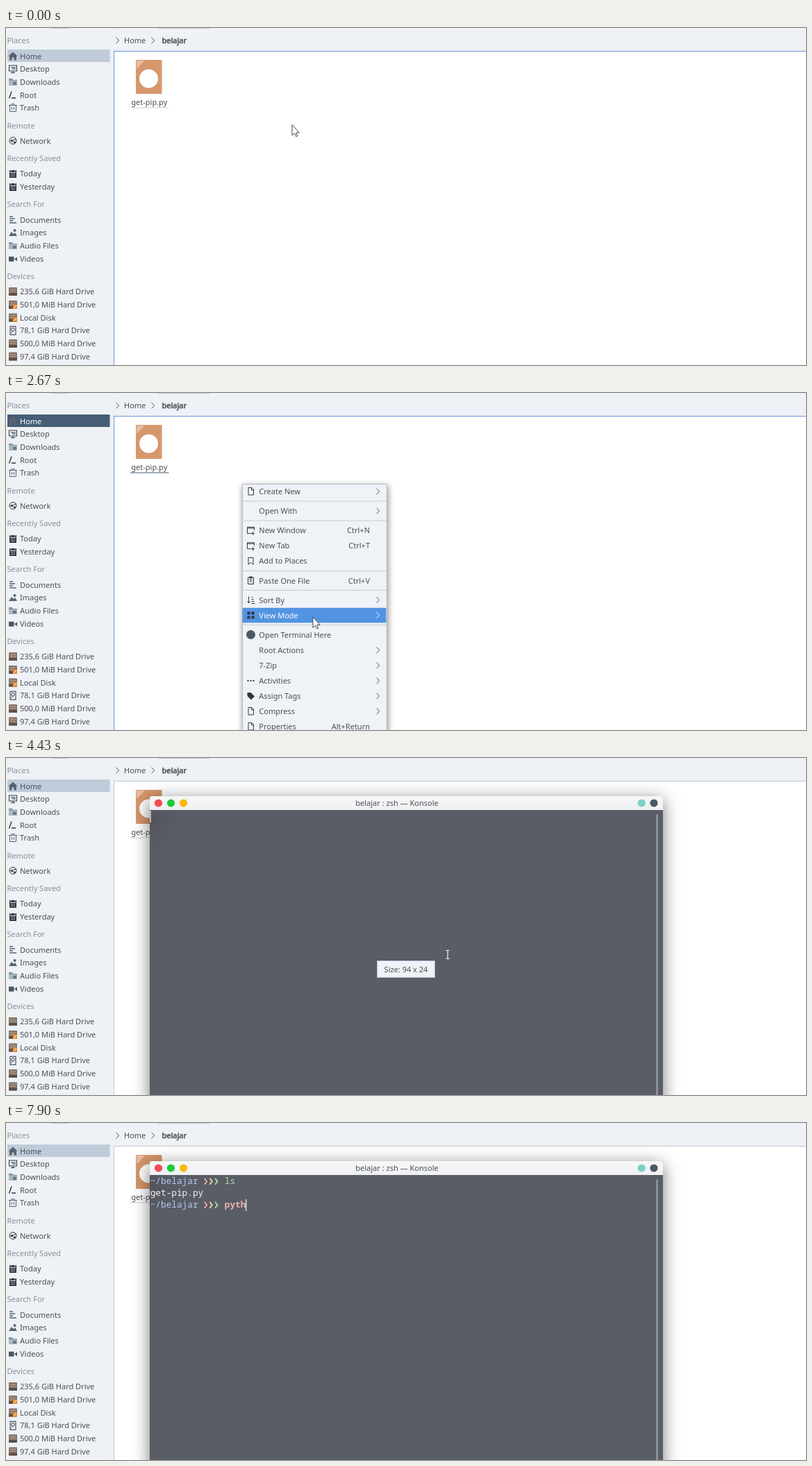
Recreate the animation shown at these times as an HTML page. Size 1152 px wide and 486 px high, loop 8000 ms.

```html
<!DOCTYPE html>
<html lang="en">
<head>
<meta charset="utf-8">
<title>File manager and terminal</title>
<style>
html, body { margin: 0; height: 100%; overflow: hidden; background: #eef1f5; }
svg { display: block; width: 100vw; height: 100vh; font: 11px "Noto Sans", sans-serif; }
text { fill: #4b4f58; white-space: pre; }
.head { fill: #8b9098; }
.strong { stroke: #4b4f58; stroke-width: .55; }
.line { fill: none; stroke: #4b4f58; }
.dark { fill: #30353c; }
.icon { stroke: #30353c; fill: none; }
#homeRow { fill: #bfcbd9; }
#frame { fill: #fff; stroke: #6f91dc; }
#underline { stroke: #c9cfdb; }
.busy #homeRow { fill: #465c77; }
.busy #homeText { fill: #fff; }
.busy #underline { stroke: #465c77; }
.covered #frame { stroke: #c5cad2; }
.selected text { fill: #fff; }
.selected .arrow { stroke: #fff; }
.panel { fill: #eff2f6; stroke: #b4bac4; filter: drop-shadow(1px 3px 5px #0007); }
.mono { font: 12.75px "Noto Sans Mono", monospace; }
</style>
</head>
<body>
<svg id="stage" viewBox="0 0 1152 486" preserveAspectRatio="none"></svg>
<script>
const stage = document.getElementById('stage');
const text = (x, y, s, attrs = '') => `<text x="${x}" y="${y}" ${attrs}>${s}</text>`;
const rect = (x, y, w, h, attrs = '') => `<rect x="${x}" y="${y}" width="${w}" height="${h}" ${attrs}/>`;
const path = (d, attrs = 'class="icon"') => `<path d="${d}" ${attrs}/>`;
const dot = (x, y, r, fill) => `<circle cx="${x}" cy="${y}" r="${r}" fill="${fill}"/>`;
const at = (x, y, body, attrs = '') => `<g transform="translate(${x} ${y})" ${attrs}>${body}</g>`;
const chevron = (x, y) => path(`M${x} ${y - 4.2}l4.3 4.2l-4.3 4.2`, 'class="line arrow"');

// Sidebar icons, centred on 0,0
const folder = path('M-6 -5h5l1 2h6v8h-12z', 'fill="#8496a5"') +
  rect(-6, -2, 12, 7, 'fill="#a9b8c3"') + rect(0, 0, 5, 4, 'fill="#667887"');
const drive = rect(-6, -6, 12, 12, 'rx="1" fill="#8a7668"') +
  rect(-6, 2, 12, 4, 'fill="#5d5049"') + path('M-4 -3h8M-4 0h8', 'stroke="#b5a396"');
const mounted = drive + rect(0, 0, 6, 6, 'fill="#f08a24"') + path('M1 5l4 -4', 'stroke="#fff"');
const calendar = rect(-5, -5, 10, 11, 'class="dark"') +
  path('M-3 -6v3M3 -6v3M-4 -1.5h8', 'stroke="#eef1f5"') +
  path('M-3 1h6M-3 3.5h6', 'stroke="#eef1f5" stroke-dasharray="1.4 1"');
const icons = {
  home: path('M-6.5 0L0 -6l6.5 6h-1.5v6h-3.5v-4h-3v4h-3.5v-6z', 'fill="#59636f"'),
  desktop: rect(-5.5, -5, 11, 8, 'class="icon"') + path('M-3 5.5h6M0 3v2M-3 -2h3v3') +
    rect(0, -3, 4, 4, 'fill="#8496a5"'),
  folder, drive, mounted, calendar,
  root: path('M-5 -5l3.5 10M0 4.5h6', 'class="icon" stroke-width="1.4" transform="scale(-1 1) translate(2 0) scale(-1 1)"')
    .replace('M-5 -5l3.5 10', 'M0 -5l-3.5 10'),
  trash: path('M-4.5 -3v8.5h9v-8.5M-6 -3.5h12M-2 -3.5v-2h4v2M-1.5 -1v4M1.5 -1v4', 'class="icon" style="stroke:#59636f"'),
  network: '<circle r="5" class="icon"/>' + path('M5 -2.5L-2 0L3 3') + dot(-2, 0, 1.5, '#30353c') + dot(2.5, 2.4, 1.4, '#30353c'),
  documents: path('M-5 -4.5h5M-5 -1.5h8M-5 1.5h5M-5 4.5h10', 'stroke="#59636f" stroke-width="1.6"'),
  images: path('M-6 5l4 -6l3 3l2 -2l3 5z', 'fill="#59636f"') + dot(2.5, -3, 2, '#59636f'),
  video: rect(-6, -3, 7.5, 7, 'fill="#4b5561"') + path('M2 0.5l4 -3v6z', 'fill="#4b5561"'),
  disk: rect(-4, -6, 8, 12, 'class="icon"') + '<circle cy="-1.5" r="2.3" class="icon"/>' + path('M-3 4l3 -3')
};
const heads = [[18, 'Places'], [140.5, 'Remote'], [188, 'Recently Saved'], [254, 'Search For'], [358, 'Devices']];
const places = [
  [40.5, 'Home', 'home'], [59, 'Desktop', 'desktop'], [77.7, 'Downloads', 'folder'],
  [96.5, 'Root', 'root'], [115, 'Trash', 'trash'], [162.5, 'Network', 'network'],
  [210, 'Today', 'calendar'], [229, 'Yesterday', 'calendar'], [276.5, 'Documents', 'documents'],
  [295, 'Images', 'images'], [314, 'Audio Files', 'folder'], [332.7, 'Videos', 'video'],
  [380, '235,6 GiB Hard Drive', 'drive'], [399, '501,0 MiB Hard Drive', 'mounted'],
  [417.6, 'Local Disk', 'mounted'], [436.3, '78,1 GiB Hard Drive', 'disk'],
  [455, '500,0 MiB Hard Drive', 'drive'], [473.6, '97,4 GiB Hard Drive', 'drive']
];
const sidebar = rect(2, 31, 147.5, 18, 'id="homeRow"') +
  heads.map(([y, s]) => text(1.5, y + 4, s, 'class="head"')).join('') +
  places.map(([y, s, icon], i) => at(10, y, icons[icon]) + text(20, y + 4, s, i ? '' : 'id="homeText"')).join('');

const toolbar = path('M65 .5h25M219 .5h74M153.5 0v1', 'stroke="#c3c8ce"') +
  chevron(158.5, 18) + text(170, 22, 'Home') + chevron(209.5, 18) + text(224.5, 22, 'belajar', 'class="strong"');

const file = `<g id="fileIcon">${rect(187, 46, 37.5, 49, 'rx="1" fill="#d6976c"')}
  ${path('M188 59v-12h12z', 'fill="#e6bda0"')}${dot(205.5, 73, 13.5, '#fff')}</g>` +
  rect(179, 98, 55.5, 17, 'id="labelHover" fill="#e8ecf2"') +
  text(180.3, 110.5, 'get-pip.py') + path('M179 115h55.5', 'id="underline"') +
  `<g id="plus">${rect(179.5, 42.5, 18, 18, 'fill="#b9babb" stroke="#929496"')}
  ${path('M188.5 45v13M182 51.5h13', 'stroke="#fff" stroke-width="1.6"')}</g>`;

// Context menu
const pageIcon = path('M-3.5 -5.5h5l2.5 2.5v8h-7.5z') + path('M1 -5v3h3');
const windowIcon = path('M5 0v-4.5h-10v9h5M-5 -3h10M3 2v5M.5 4.5h5');
const items = [
  [142, 'Create New', '>', pageIcon], [170, 'Open With', '>'],
  [198, 'New Window', 'Ctrl+N', windowIcon], [220.3, 'New Tab', 'Ctrl+T', windowIcon],
  [242.4, 'Add to Places', '', path('M-3.5 -5h7v10l-3.5 -3l-3.5 3z')],
  [270.5, 'Paste One File', 'Ctrl+V', path('M-4 -4.5h8v9.5h-8zM-2 -1h4M-2 1.5h4') + rect(-2, -6, 4, 3, 'class="dark"')],
  [298.5, 'Sort By', '>', path('M-3 -5v9M-5 2l2 2.5l2 -2.5M1 -4h2M1 -1h3M1 2h4M1 5h5')],
  [320.5, 'View Mode', '>', [[-5, -5], [1, -5], [-5, 1], [1, 1]].map(([x, y]) => rect(x, y, 4, 4, 'class="dark"')).join('')],
  [348.5, 'Open Terminal Here', '', dot(0, 0, 6.5, '#4a5963')],
  [370.8, 'Root Actions', '>'], [392.9, '7-Zip', '>'],
  [414.9, 'Activities', '>', path('M-5 0h10', 'stroke="#30353c" stroke-width="2" stroke-dasharray="2 2"')],
  [437, 'Assign Tags', '>', path('M-5 -5h5l5.5 5.5l-5 5l-5.5 -5.5z', 'class="dark"')],
  [459, 'Compress', '>', pageIcon], [481, 'Properties', 'Alt+Return', pageIcon]
];
const entry = (x, w, [y, label, right, icon = '']) => `<g class="entry" data-y="${y}">` +
  rect(x + .5, y - 10.7, w - 1, 21.6, 'fill="#5294e2" class="bar"') + at(x + 12.5, y, icon) + text(x + 24.3, y + 4, label) +
  (right === '>' ? chevron(x + 193.5, y) : text(x + w - 24, y + 4, right, 'text-anchor="end"')) + '</g>';
const menu = `<g id="menu">${rect(340.5, 131.5, 208, 370, 'class="panel"')}` +
  path([156, 184, 256.5, 284.5, 334.5].map(y => `M341 ${y}h207`).join(''), 'stroke="#c6ccd4"') +
  items.map(item => entry(340, 208, item)).join('') + '</g>';
const submenu = `<g id="submenu">${rect(548.5, 309.5, 157, 67, 'class="panel"')}` +
  ['Icons', 'Compact', 'Details'].map((s, i) =>
    entry(548, 157, [320.5 + 22 * i, s, `Ctrl+${i + 1}`, `<circle r="5" class="icon"/>${i ? '' : dot(0, 0, 2.5, '#30353c')}`])).join('') + '</g>';

// Terminal
const CELL = 7.65;
const column = n => 207.7 + n * CELL;
const mono = (col, y, s, fill, attrs = '') => text(column(col), y, s, `class="mono" style="fill:${fill}" ${attrs}`);
const prompt = y => mono(0, y, '~/belajar', '#b5c9f2') +
  ['#efb0b0', '#f3e3a6', '#b0dfad'].map((color, i) =>
    path(`M${column(10 + i) + 1.6} ${y - 8.5}l3.4 4.5l-3.4 4.5`, `fill="none" stroke="${color}" stroke-width="1.7"`)).join('');
const terminal = `<g id="terminal">
  <path d="M207 500V58q0 -3 3 -3h733q3 0 3 3v442z" fill="#595d66" style="filter:drop-shadow(0 5px 12px #0008)"/>
  <path d="M207 75V58q0 -3 3 -3h733q3 0 3 3v17z" fill="url(#bar)"/>
  ${rect(207, 75, 70, 75, 'fill="url(#ghost)"')}
  ${dot(219.5, 65, 5.6, '#f04d55')}${dot(237.5, 65, 5.6, '#1acb3b')}${dot(255.5, 65, 5.6, '#fbb80f')}
  ${dot(915.3, 65, 5.6, '#7bd0c9')}${dot(933, 65, 5.6, '#4a5963')}
  ${text(563, 69, 'belajar : zsh — Konsole', 'text-anchor="middle"')}
  ${rect(936, 81, 3, 420, 'rx="1.5" fill="#8c9099"')}
  <g id="firstPrompt">${prompt(88.3)}</g>${mono(14, 88.3, '', '#b0dfad', 'id="list"')}
  <g id="output">${mono(0, 105.3, 'get-pip.py', '#f4f5f7')}${prompt(122.3)}</g>
  ${mono(14, 122.3, '', '#f0b0b3', 'id="command" font-weight="bold"').replace('style="', 'style="font-weight:bold;')}
  ${rect(0, 0, 1.2, 17, 'id="caret" fill="#f4f5f7"')}
  <g id="size">${rect(534.5, 292.5, 83, 24, 'fill="#eff2f7" stroke="#aab8cc"')}${text(576, 308.5, 'Size: 94 x 24', 'text-anchor="middle"')}</g>
  <g id="beam">${path('M633.5 277.5h2l.5 .5l.5 -.5h2M636 278v11M633.5 289.5h2l.5 -.5l.5 .5h2', 'fill="none" stroke="#f4f5f7" stroke-width="1.2"')}</g>
</g>`;

stage.innerHTML = `<defs>
  <linearGradient id="bar" x2="0" y2="1"><stop stop-color="#f7f7f8"/><stop offset="1" stop-color="#eff0f1"/></linearGradient>
  <radialGradient id="ghost" cx="0" cy=".2" r=".9"><stop stop-color="#4f4d52" stop-opacity=".6"/><stop offset="1" stop-color="#595d66" stop-opacity="0"/></radialGradient>
</defs>` + rect(0, 0, 1152, 486, 'fill="#eef1f5"') + sidebar + toolbar +
  rect(155.5, 33.5, 1010, 470, 'id="frame"') + file + menu + submenu +
  '<ellipse id="launcher" fill="#4a5963"/>' + terminal +
  path('M.5 .5V16L4 12.8L6.2 17.6L8.3 16.6L6.2 12H10.8Z', 'id="pointer" fill="#fff" stroke="#44484e" stroke-linejoin="round"');

const $ = id => document.getElementById(id);
const entries = [...document.querySelectorAll('.entry')];
const show = (id, on) => { $(id).style.display = on ? '' : 'none'; };
const clamp = v => Math.max(0, Math.min(1, v));

// Pointer moves: first step, last step, number of steps, goal
const moves = [
  [630, 970, 11, 230, 97], [1430, 1800, 4, 340, 136], [2230, 2670, 4, 441.5, 322.5],
  [3230, 3470, 3, 432, 344], [3770, 4200, 4, 635, 282.5]
];
function pointerAt(t) {
  let x = 411.5, y = 139;
  for (const [start, end, steps, goalX, goalY] of moves) {
    if (t < start) break;
    const p = (1 + Math.floor(clamp((t - start) / (end - start)) * (steps - 1))) / steps;
    x += (goalX - x) * p;
    y += (goalY - y) * p;
  }
  return [x, y];
}

function draw(t) {
  const [x, y] = pointerAt(t);
  const terminalOpen = t >= 4430, menuOpen = t >= 2130 && t < 3770;
  stage.classList.toggle('busy', t >= 2130 && !terminalOpen);
  stage.classList.toggle('covered', terminalOpen);

  const hover = clamp((t - 870) / 100) * clamp((1630 - t) / 200);
  $('fileIcon').style.opacity = 1 - .4 * hover;
  $('labelHover').style.opacity = hover;
  show('plus', t >= 1330 && t < 1530);

  show('menu', menuOpen);
  show('submenu', t >= 2930 && t < 3350);
  for (const item of entries) {
    const on = t >= 2230 && x < 548 && Math.abs(y - item.dataset.y) < 11 && !item.closest('#submenu');
    item.classList.toggle('selected', on);
    item.querySelector('.bar').style.display = on ? '' : 'none';
  }

  show('pointer', !terminalOpen);
  $('pointer').setAttribute('transform', `translate(${x} ${y})`);
  const launcher = $('launcher');
  show('launcher', t >= 3870 && !terminalOpen);
  const squash = t >= 4200 ? 1 : Math.abs(Math.cos((Math.floor(t / 110) * 110 - 3870) / 160));
  launcher.setAttribute('cx', x + 21.7);
  launcher.setAttribute('cy', y + 28.5 - 5 * (1 - squash));
  launcher.setAttribute('rx', 8 - 2.8 * squash);
  launcher.setAttribute('ry', 6 + 2.8 * squash);

  show('terminal', terminalOpen);
  show('firstPrompt', t >= 4770);
  show('size', t < 5530);
  show('beam', t < 5170);
  show('output', t >= 6100);
  const list = 'ls'.slice(0, (t >= 5170) + (t >= 5370));
  const command = 'pyth'.slice(0, 2 * (t >= 7270) + (t >= 7470) + (t >= 7900));
  $('list').textContent = list;
  $('command').textContent = command;
  const entered = t >= 6100;
  const cells = t < 4770 ? 0 : 14 + (entered ? command : list).length;
  $('caret').setAttribute('x', column(cells) - .3);
  $('caret').setAttribute('y', entered ? 110 : 76);
  show('caret', t < 6400 || t >= 6930);
}

function tick() {
  draw(performance.now() % 8000);
  requestAnimationFrame(tick);
}
tick();
</script>
</body>
</html>
```
